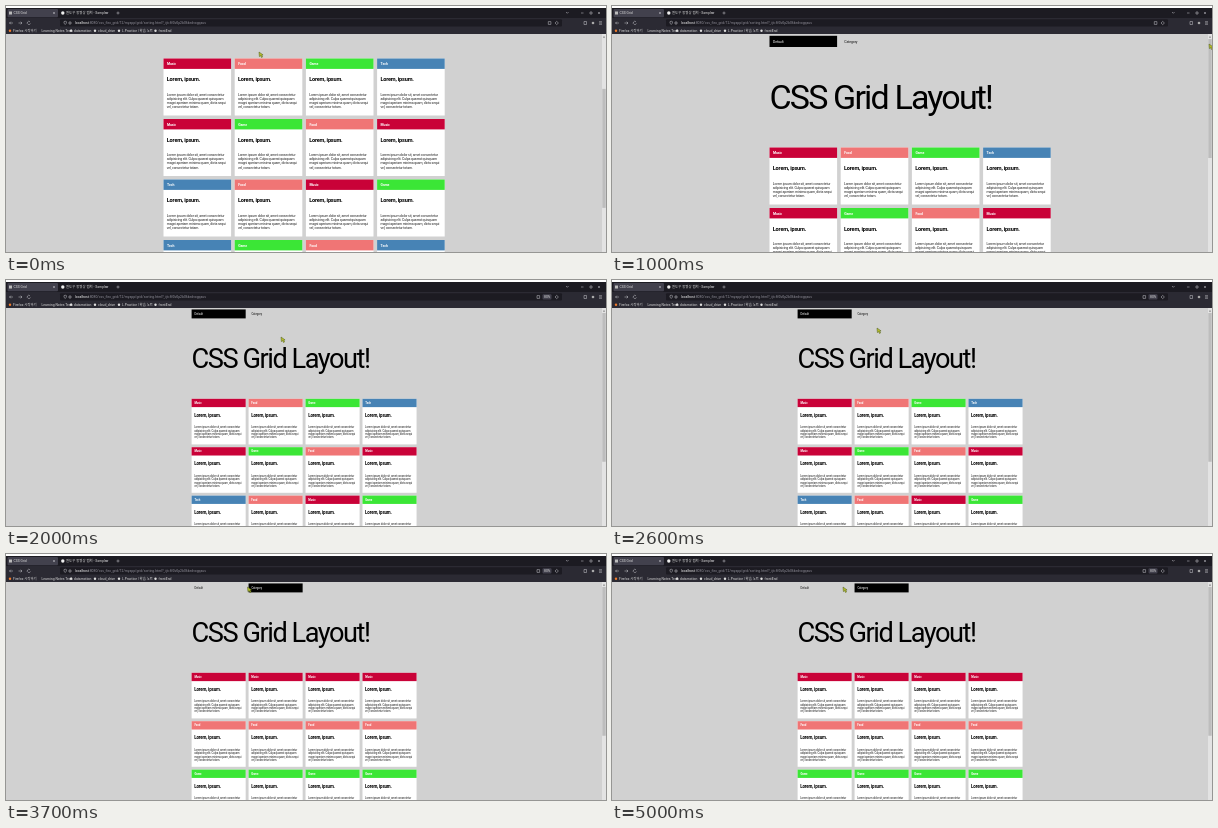
An HTML page for the animation above (5100 ms loop, 600 by 246 pixels).

```html
<!DOCTYPE html>
<html lang="ko">
<head>
<meta charset="utf-8">
<title>CSS Grid</title>
<style>
  html, body { margin: 0; width: 100%; height: 100%; overflow: hidden; background: #d1d1d1; }
  svg { display: block; width: 600px; height: 246px; }
  text { font-family: Roboto, "Noto Sans CJK KR", "Noto Sans CJK", sans-serif; white-space: pre; }
  .headline { font-size: 34px; letter-spacing: -.054em; }
  .label { font-size: 3.5px; font-weight: 700; letter-spacing: -.03em; fill: #fff; }
  .nav { font-size: 3.5px; letter-spacing: -.03em; }
  .heading { font-size: 5.6px; font-weight: 700; letter-spacing: -.036em; }
  .copy { font-size: 3.5px; letter-spacing: -.04em; fill: #222; }
  .ui { font-size: 3.4px; fill: #ddd; }
  .dim { fill: #8f8e98; }
  .line { fill: none; stroke: #c8c8cf; stroke-width: .5; }
</style>
</head>
<body>
<svg id="stage" viewBox="0 0 600 246"></svg>
<script>
const LOOP = 5100, STEP = 100;
const PAGE_TOP = 28, PAGE_CENTER = 298, LEFT = -140.5;
const COL = 71.2, ROW = 60.5, CARD_W = 67.6, CARD_H = 57, CARDS_TOP = 113.5;
const KINDS = {
  M: ['Music', '#c90238'], F: ['Food', '#f07575'],
  G: ['Game', '#3be636'], T: ['Tech', '#4783b5']
};
const DEFAULT_ORDER = 'MFGTMGFMTFMGTGFT';
const SORTED_ORDER = 'MMMMFFFFGGGGTTTT';
const COPY = [
  'Lorem ipsum dolor sit, amet consectetur',
  'adipisicing elit. Culpa quaerat quisquam',
  'magni aperiam minima quam, dicta sequi',
  'vel, consectetur totam.'
];

// Each row: time, value(s)
const SCROLL = [[0, 89], [100, 82], [200, 66], [300, 46], [400, 28], [500, 14.5], [600, 5], [700, 0]];
const ZOOM = [[0, 1], [1700, .9], [1900, .8]];
const SORTED = [[0, false], [3000, true], [3800, false], [4400, true]];
const POINTER = [
  [0, 253, 46], [500, 255, 54], [700, 300, 55], [900, 597, 38], [1200, 597, 38],
  [1500, 275, 57], [2500, 275, 57], [2800, 245, 30], [3100, 245, 30], [3200, 229, 30],
  [3300, 229, 30], [3500, 252, 33], [3600, 252, 33], [3800, 231, 33], [4100, 236, 34],
  [4200, 239, 36], [4400, 250, 32], [4800, 250, 32], [5000, 231, 33]
];

const stage = document.getElementById('stage');

function add(parent, name, attrs = {}, content = '') {
  const node = document.createElementNS('http://www.w3.org/2000/svg', name);
  for (const key in attrs) node.setAttribute(key, attrs[key]);
  node.textContent = content;
  return parent.appendChild(node);
}
const rect = (parent, x, y, width, height, fill, rx = 0) =>
  add(parent, 'rect', { x, y, width, height, fill, rx });
const text = (parent, x, y, className, content) =>
  add(parent, 'text', { x, y, class: className }, content);
const line = (parent, d) => add(parent, 'path', { d, class: 'line' });
const dot = (parent, cx, cy, r, fill) => add(parent, 'circle', { cx, cy, r, fill });

function buildPage() {
  const page = add(stage, 'g');
  const buttons = ['Default', 'Category'].map((name, i) => {
    const x = LEFT + i * COL;
    return {
      box: rect(page, x, 1.8, CARD_W, 11.2, '#000'),
      caption: text(page, x + 3.5, 8.7, 'nav', name)
    };
  });
  text(page, LEFT, 75, 'headline', 'CSS Grid Layout!');
  const cards = [...DEFAULT_ORDER].map((_, i) => {
    const card = add(page, 'g', {
      transform: `translate(${LEFT + i % 4 * COL} ${CARDS_TOP + Math.floor(i / 4) * ROW})`
    });
    rect(card, 0, 0, CARD_W, CARD_H, '#fff');
    const bar = rect(card, 0, 0, CARD_W, 10.4, '#000');
    const label = text(card, 3.5, 6.6, 'label', '');
    text(card, 3.3, 22.7, 'heading', 'Lorem, ipsum.');
    COPY.forEach((row, n) => text(card, 3.3, 37 + n * 4.2, 'copy', row));
    return { bar, label };
  });
  return { page, buttons, cards };
}

function buildBrowser() {
  const ui = add(stage, 'g');
  rect(ui, 0, 0, 600, 2, '#fff');
  rect(ui, 0, 2, 600, 10, '#1c1b22');
  rect(ui, 0, 12, 600, 16, '#2b2a33');

  rect(ui, 1.5, 3, 50.5, 8.2, '#42414d', 1);
  rect(ui, 3, 5.5, 3, 3, '#bbb');
  text(ui, 7.5, 8.2, 'ui', 'CSS Grid');
  dot(ui, 56.8, 7, 1.7, '#eee');
  text(ui, 60, 8.2, 'ui', '윈도우 동영상 캡쳐 - Sample -');
  for (const x of [48, 101, 593]) line(ui, `M${x - 1} 6l2 2m0 -2l-2 2`);
  line(ui, 'M110.5 7h3m-1.5 -1.5v3M560 6l1.3 1.3l1.3 -1.3M575 7h2.5M584 6h2v2h-2z');

  line(ui, 'M7 17h-3.5l1.3 -1.3m-1.3 1.3l1.3 1.3M12.5 17h3.5l-1.3 -1.3m1.3 1.3l-1.3 1.3M24 15.8a1.6 1.6 0 1 0 .4 1.6');
  rect(ui, 54, 13.2, 502, 7.2, '#1c1b22', 1);
  line(ui, 'M58 15.6l1.2 -.4l1.2 .4v1.5l-1.2 1.4l-1.2 -1.4zM63 16h2v2h-2z');
  const url = text(ui, 69, 18.2, 'ui dim', '');
  add(url, 'tspan', { fill: '#fff' }, 'localhost');
  add(url, 'tspan', {}, ':8080/css_flex_grid/12/myapp/grid/sorting.html?_ijt=8f0v0p2b06kedvogqaus');
  line(ui, 'M549 17l1.7 -1.6l1.7 1.6l-1.7 1.6zM578 15.5v3h2.5v-3zM593 15.7h3m-3 1.3h3m-3 1.3h3');
  dot(ui, 587, 17, 1.3, '#aaa');
  const gridIcon = line(ui, 'M542.3 15.6h2.6v2.8h-2.6z');
  const pill = add(ui, 'g');
  line(pill, 'M531 15.6h2.6v2.8h-2.6z');
  rect(pill, 536.5, 14.3, 9, 5.2, '#42414d', 1);
  const percent = text(pill, 538, 18.1, 'ui', '');

  const bookmarks = [
    [4, 'Firefox 시작하기', '#f07a2a'], [32.5, 'Learning Notes Tech', '#2b2a33'],
    [65, 'datamotion', '#ddd'], [89, 'cloud_drive', '#ddd'],
    [113, 'L.Practice | 학습 노트', '#ddd'], [149.5, 'frontEnd', '#ddd']
  ];
  for (const [x, name, color] of bookmarks) {
    dot(ui, x, 24.8, 1.2, color);
    text(ui, x + 3, 26, 'ui', name);
  }

  rect(ui, 596, 28, 4, 218, '#e3e3e3');
  add(ui, 'path', { d: 'M597 31.5l1 -1.3l1 1.3z', fill: '#555' });
  const thumb = rect(ui, 596.3, 33, 3.4, 119, '#bdbdbd');
  return { gridIcon, pill, percent, thumb };
}

const { page, buttons, cards } = buildPage();
const browser = buildBrowser();
const pointer = add(stage, 'path', {
  d: 'M0 0l.4 4.6l1.2 -.9l.9 1.8l1.1 -.6l-.9 -1.7l1.4 -.3z',
  fill: '#b5bd2b', stroke: '#4c5a1c', 'stroke-width': .5
});

const held = (table, t) => table.filter(row => row[0] <= t).pop()[1];

function tween(table, t) {
  const next = table.findIndex(row => row[0] > t);
  if (next < 0) return table[table.length - 1].slice(1);
  const a = table[next - 1], b = table[next];
  const k = (t - a[0]) / (b[0] - a[0]);
  return a.slice(1).map((v, i) => v + (b[i + 1] - v) * k);
}

function render(t) {
  const [scroll] = tween(SCROLL, t);
  const [x, y] = tween(POINTER, t);
  const zoom = held(ZOOM, t), sorted = held(SORTED, t);

  page.setAttribute('transform',
    `translate(${PAGE_CENTER} ${PAGE_TOP}) scale(${zoom}) translate(0 ${-scroll})`);
  pointer.setAttribute('transform', `translate(${x} ${y})`);

  buttons.forEach(({ box, caption }, i) => {
    const active = sorted === (i === 1);
    box.setAttribute('visibility', active ? 'visible' : 'hidden');
    caption.setAttribute('fill', active ? '#fff' : '#111');
  });
  const order = sorted ? SORTED_ORDER : DEFAULT_ORDER;
  cards.forEach(({ bar, label }, i) => {
    const [name, color] = KINDS[order[i]];
    bar.setAttribute('fill', color);
    label.textContent = name;
  });

  browser.thumb.setAttribute('y', 33 + scroll * .56);
  browser.thumb.setAttribute('height', 119 / zoom);
  browser.pill.setAttribute('visibility', zoom < 1 ? 'visible' : 'hidden');
  browser.gridIcon.setAttribute('visibility', zoom < 1 ? 'hidden' : 'visible');
  browser.percent.textContent = Math.round(zoom * 100) + '%';
}

const start = performance.now();
function tick() {
  const t = (performance.now() - start) % LOOP;
  render(Math.floor(t / STEP) * STEP);
  requestAnimationFrame(tick);
}
tick();
</script>
</body>
</html>
```
